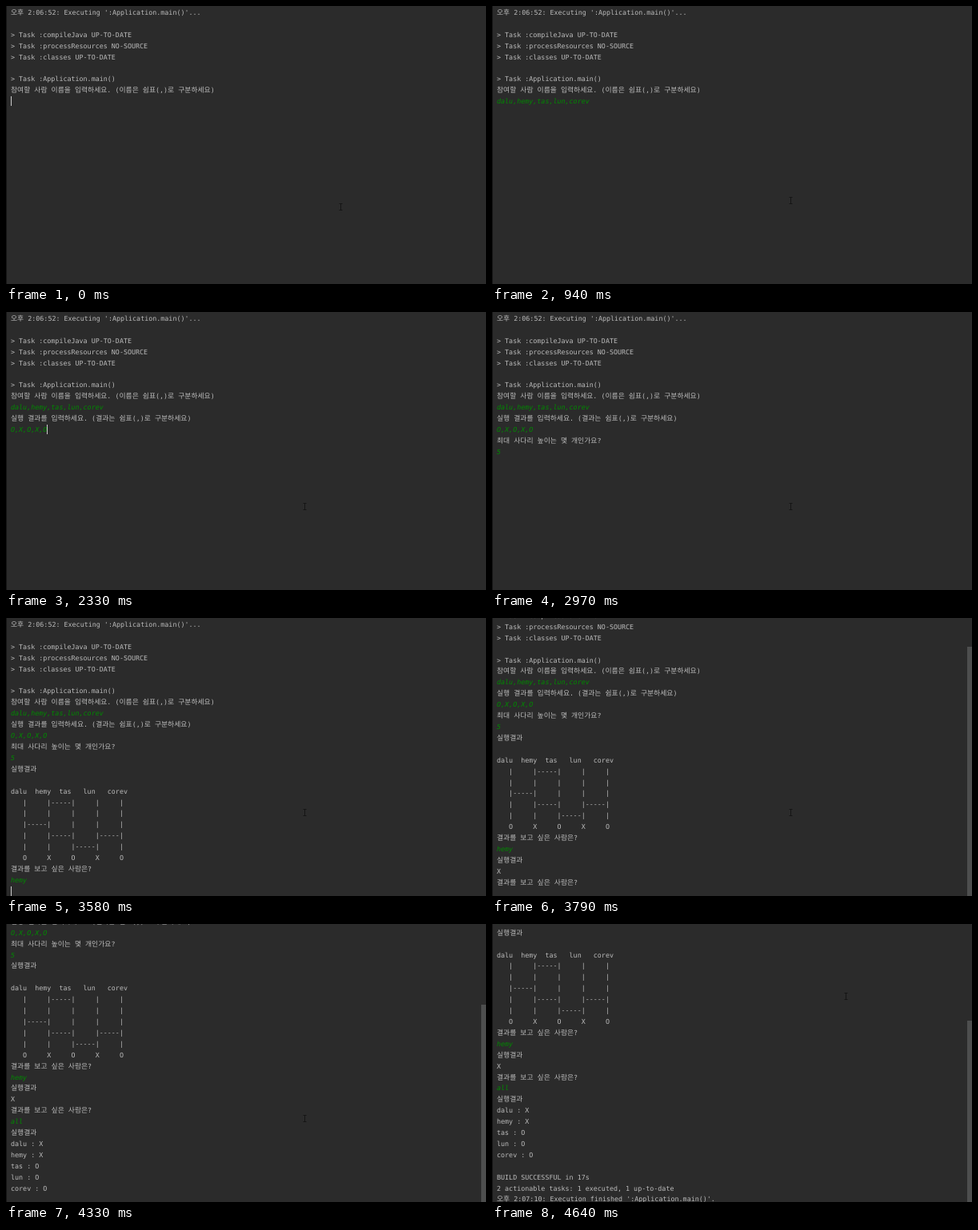
An HTML page for the animation above (4670 ms loop, 600 by 348 pixels).

```html
<!DOCTYPE html>
<html lang="ko">
<head>
<meta charset="utf-8">
<style>
html, body { margin: 0; width: 100%; height: 100%; overflow: hidden; background: #2b2b2b; }
#stage { position: relative; width: 600px; height: 348px; overflow: hidden; }
#stage > * { position: absolute; }
#edge { left: 0; top: 0; width: 1px; height: 348px; background: #151515; }
#log {
  left: 6px; white-space: pre; color: #bbb;
  font: 8.37px/13.92px "DejaVu Sans Mono", "Noto Sans CJK KR", monospace;
  font-variant-ligatures: none; text-rendering: geometricPrecision;
}
#log div { height: 13.92px; }
#log b { font: 8.8px/0 "Noto Sans CJK KR", "Noto Sans CJK", sans-serif; }
#log .input { color: #008a00; font-style: italic; }
#caret { width: 1px; height: 12px; background: #ccc; }
#thumb { left: 594px; width: 6px; bottom: 0; background: #4d4e4e; }
#mouse { left: 0; top: 0; }
</style>
</head>
<body>
<div id="stage">
  <div id="edge"></div>
  <div id="log"></div>
  <div id="caret"></div>
  <div id="thumb"></div>
  <svg id="mouse" width="5" height="9"><path d="M.5.5H4.5M.5 8.5H4.5M2.5 1V8" stroke="#151515"/></svg>
</div>
<script>
const LOOP = 4670, LINE = 13.92, CHAR = 5.04, BLINK = 130;
const [log, caret, thumb, mouse] = ['log', 'caret', 'thumb', 'mouse'].map(id => document.getElementById(id));

const names = ['dalu', 'hemy', 'tas', 'lun', 'corev'];
const results = ['O', 'X', 'O', 'X', 'O'];
const finals = ['X', 'X', 'O', 'O', 'O'];
const rungs = ['0100', '0000', '1000', '0101', '0010'];

const ladder = rungs.map(row =>
  '   |' + [...row].map(r => (r === '1' ? '-----' : '     ') + '|').join('')).join('\n');
const board = '\n실행결과\n\n' + names.map(n => n.padEnd(6)).join('') + '\n' + ladder +
  '\n' + results.map(r => '   ' + r + '  ').join('');
const ask = '\n결과를 보고 싶은 사람은?\n';

const events = [];
const print = (t, text) => events.push({ t, text });
const type = (t, gap, text) =>
  [...text].forEach((c, i) => events.push({ t: t + i * gap, text: c, input: true }));

print(0, `오후 2:06:52: Executing ':Application.main()'...

> Task :compileJava UP-TO-DATE
> Task :processResources NO-SOURCE
> Task :classes UP-TO-DATE

> Task :Application.main()
참여할 사람 이름을 입력하세요. (이름은 쉼표(,)로 구분하세요)
`);
type(100, 30, names.join());
print(1050, '\n실행 결과를 입력하세요. (결과는 쉼표(,)로 구분하세요)\n');
type(1200, 110, 'O,X');
type(1680, 120, ',O,X,O');
print(2500, '\n최대 사다리 높이는 몇 개인가요?\n');
type(2790, 0, '5');
print(2980, board + ask);
type(3300, 70, names[1]);
print(3560, '\n');
print(3670, '실행결과\nX' + ask);
type(4090, 30, 'all');
print(4230, '\n실행결과\n' + names.map((n, i) => `${n} : ${finals[i]}\n`).join(''));
print(4390, `
BUILD SUCCESSFUL in 17s
2 actionable tasks: 1 executed, 1 up-to-date
오후 2:07:10: Execution finished ':Application.main()'.`);

const clamp = v => Math.min(1, Math.max(0, v));
const toHtml = l => `<div class="${l.input ? 'input' : ''}">` +
  l.text.replace(/>/g, '&gt;').replace(/[가-힣]+/g, '<b>$&</b>') + '</div>';

let shown = -1, lines;

function update(count) {
  lines = [{ text: '' }];
  for (const e of events.slice(0, count)) {
    e.text.split('\n').forEach((part, i) => {
      if (i) lines.push({ text: '' });
      const last = lines[lines.length - 1];
      last.text += part;
      if (e.input) last.input = true;
    });
  }
  log.innerHTML = lines.map(toHtml).join('');
  const shift = Math.max(0, lines.length * LINE - 350.9);
  const top = 348 * shift / (shift + 335);
  log.style.top = 2 - shift + 'px';
  thumb.style.top = Math.round(top) + 'px';
  thumb.hidden = !shift;
  const row = lines.length - 1;
  caret.style.left = Math.round(5.6 + lines[row].text.length * CHAR) + 'px';
  caret.style.top = Math.round(row * LINE + 1.8 - shift) + 'px';
}

function moveMouse(t) {
  const a = clamp((t - 60) / 440), b = clamp((t - 4450) / 190);
  const ease = a * a * (3 - 2 * a);
  const x = 416.4 - 45 * ease + 69 * b;
  const y = 247 - 8 * ease - 153 * (1 - (1 - b) ** 1.65);
  mouse.style.transform = `translate(${Math.round(x)}px, ${Math.round(y)}px)`;
}

function frame() {
  const t = performance.now() % LOOP;
  const count = events.filter(e => e.t <= t).length;
  if (count !== shown) update(shown = count);
  const idle = t - events[count - 1].t;
  caret.hidden = lines.length > 27 || idle % (2 * BLINK) >= BLINK;
  moveMouse(t);
  requestAnimationFrame(frame);
}
frame();
</script>
</body>
</html>
```
